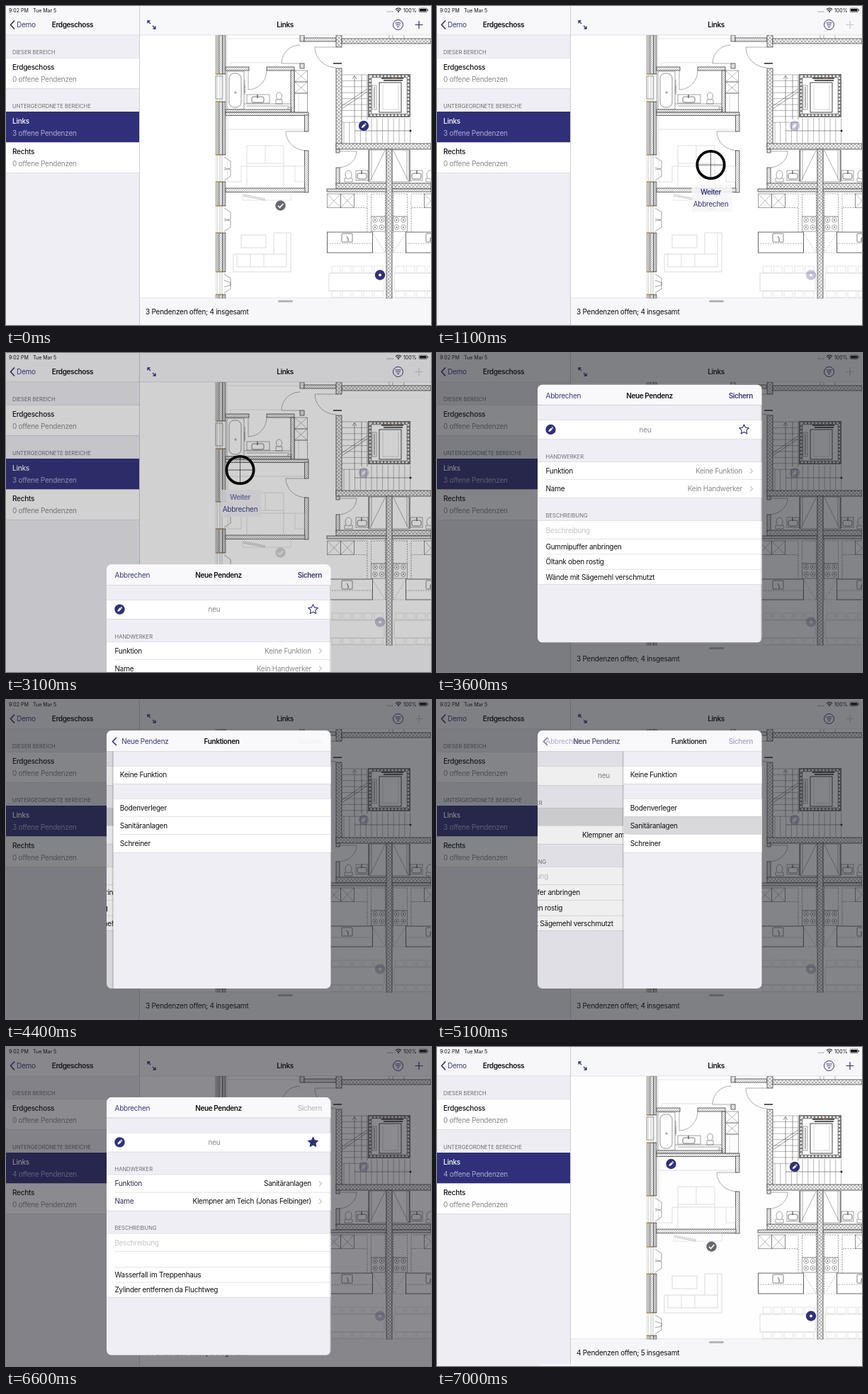
An HTML page for the animation above (7100 ms loop, 600 by 450 pixels).

```html
<!DOCTYPE html>
<html lang="de">
<head>
<meta charset="utf-8">
<title>Neue Pendenz</title>
<style>
html, body { margin: 0; width: 100%; height: 100%; overflow: hidden; background: #fff; }
svg { display: block; width: 600px; height: 450px; }
text { font: 400 10px Inter, "Open Sans", sans-serif; letter-spacing: -.25px; fill: #111; white-space: pre; }
text.b { font-weight: 600; letter-spacing: -.4px; }
text.r { font-weight: 500; }
text.h { font-size: 7.6px; letter-spacing: 0; fill: #6d6d72; }
text.s { font-size: 7px; letter-spacing: 0; }
text.g { fill: #8a8a8f; }
text.p { fill: #c5c5ca; }
text.n { fill: #3a3a80; }
text.w { fill: #fff; }
text.l { fill: #a9a9cf; }
text.m { text-anchor: middle; }
text.e { text-anchor: end; }
</style>
</head>
<body>
<svg id="stage" viewBox="0 0 600 450" xmlns="http://www.w3.org/2000/svg"></svg>
<script>
const NAVY = '#30307a', PALE = '#d2d2d4', LOOP = 7100;
const stage = document.getElementById('stage');

const rect = (x, y, w, h, fill, more = '') =>
  `<rect x="${x}" y="${y}" width="${w}" height="${h}" fill="${fill}" ${more}/>`;
const path = (d, color = '#666', w = .6, more = '') =>
  `<path d="${d}" fill="none" stroke="${color}" stroke-width="${w}" ${more}/>`;
const circle = (x, y, r, fill, more = '') =>
  `<circle cx="${x}" cy="${y}" r="${r}" fill="${fill}" ${more}/>`;
const text = (x, y, str, cls = '', id = '') =>
  `<text x="${x}" y="${y + 3.6}" class="${cls}" ${id && `id="${id}"`}>${str}</text>`;
const group = (id, body, more = '') => `<g id="${id}" ${more}>${body}</g>`;
const box = (x, y, w, h, c = '#666', sw = .6, more = '') =>
  rect(x, y, w, h, 'none', `stroke="${c}" stroke-width="${sw}" ${more}`);
const wall = (x, y, w, h, fill = 'hatch') =>
  rect(x, y, w, h, `url(#${fill})`, 'stroke="#444" stroke-width=".8"');
const crossed = (x, y, w, h) =>
  box(x, y, w, h) + path(`M${x} ${y}l${w} ${h}m0 ${-h}l${-w} ${h}`, '#777', .5);
const bowl = (x, y, rx, ry) =>
  `<ellipse cx="${x}" cy="${y}" rx="${rx}" ry="${ry}" fill="#fff" stroke="#666" stroke-width=".6"/>`;
const repeat = (n, fn) => Array.from({ length: n }, (_, i) => fn(i)).join('');
const line = (x, y, w) => rect(x, y, w, .5, '#c8c7cc');

const defs = `<defs>
  <pattern id="hatch" width="3" height="3" patternUnits="userSpaceOnUse">
    <rect width="3" height="3" fill="#f6f6f6"/><path d="M0 3L3 0" stroke="#888" stroke-width=".6"/></pattern>
  <pattern id="cross" width="5" height="5" patternUnits="userSpaceOnUse">
    <rect width="5" height="5" fill="#f2f2f2"/><path d="M0 0L5 5M5 0L0 5" stroke="#777" stroke-width=".6"/></pattern>
  <clipPath id="planClip"><rect x="188.5" y="41" width="411.5" height="372"/></clipPath>
  <clipPath id="sheetClip"><rect x="142" y="43" width="316.5" height="364" rx="7"/></clipPath>
</defs>`;

function outerWall() {
  const solid = [[41, 55], [135, 75], [248, 34], [320, 55], [407, 6]];
  const windows = [[96, 39], [210, 38], [282, 38], [375, 32]];
  return path('M297.7 41V413', '#c4c2bd', 2.4) + path('M296 41V413M299.500 41V413', '#888', .7) +
    solid.map(([y, h]) => wall(301, y, 4.5, h) + rect(305.5, y, 4.5, h, '#c4c4c4', 'stroke="#444" stroke-width=".6"')).join('') +
    windows.map(([y, h], i) =>
      rect(295.5, y, 14, h, '#fff') + path(`M296 ${y}h14M296 ${y + h}h14`, '#444', .7) +
      path(`M298 ${y}v${h}M302 ${y}v${h}M305 ${y}v${h}`, '#888', .5) +
      path(`M296 ${y}h9M296 ${y + h}h9`, '#c89b4a', 1.2) +
      path(i ? `M308 ${y + 3}l9 6v10l-9 2M308 ${y + h - 2}l9 -6v-9l-9 -3`
             : `M296 ${y + 3}h10v32h-10zM310 ${y}v${h}`)).join('');
}

function bath() {
  return wall(310, 86, 33, 5) + wall(368, 86, 39, 5) + wall(402, 91, 5, 59) +
    box(312, 92, 24, 54) + box(315, 95, 17, 48, '#666', .7, 'rx="7"') + path('M322 122h4m-2-2v4') +
    path('M342 91V118A26 27 0 0 0 368 91', '#777') +
    path('M337 104V123M336 138H402M340 141H400') + path('M337 125V112', '#444', .6, 'stroke-dasharray="2 1"') +
    box(340, 125, 32, 12) + box(347, 128, 17, 8, '#444', .7, 'rx="2"') + path('M355 125v5', '#333', 1) +
    box(381, 132, 9, 6) + bowl(385.5, 127, 4, 5) + box(398, 143, 5, 5) + wall(310, 146, 92, 4);
}

function rooms() {
  return path('M312 46H415M312 41V86M317 86V80H390', PALE) +
    wall(310, 150, 117, 4.5) + wall(421.5, 154, 5.5, 23) + wall(421.5, 204, 5.5, 59) + wall(310, 257, 112, 5.5) +
    path('M424 177H395A29 27 0 0 0 424 204', '#777') +
    path('M313 174H421M313 154V248H332V226H408M340 257V197H392V257M340 222H392M366 197V222', PALE, .7) +
    box(408, 226, 13, 22, PALE) +
    wall(415, 41, 6, 9) + wall(415, 81, 6, 7) + wall(421, 45, 45, 5) +
    path('M415 81H389A26 26 0 0 1 415 55', '#777') +
    repeat(2, i => crossed(407.5, 91 + 16 * i, 18, 16)) + box(407.5, 123, 18, 27) + path('M413 123V150', '#999', .5, 'stroke-dasharray="2 1"') +
    box(334, 263, 68, 11, PALE) + path('M335 266L366 272M335 268L366 274', '#999') +
    box(332, 323, 35, 18, PALE, .8) + path('M321 350H378V320H402V375H321ZM326 350V368H396V320M345 350V368M364 350V368M378 350H396', PALE, .8);
}

function stairwell() {
  return wall(466, 41, 8, 17, 'cross') + wall(474, 46, 126, 7, 'cross') + wall(466, 88, 8, 112, 'cross') +
    path('M541 41V46M546 41V46M562 41V46', '#777') +
    path('M466 58H436A31 29 0 0 0 466 87', '#777') + path('M462 81H474', '#222', 1.6) +
    wall(466, 194, 134, 8, 'cross') +
    repeat(9, i => path(`M474 ${97 + 8.4 * i}H510`, '#888')) + path('M492 164V99M489 103L492 98L495 103M474 141L510 117M474 145L510 121', '#555') +
    repeat(13, i => path(`M${477 + 7.8 * i} ${i < 5 ? 164 : 158}V193`, '#888')) +
    path('M492 176H571M510 97V160M502 97V160', '#555') + circle(571, 176, 1.5, '#222') +
    box(511.5, 96.5, 59, 60, '#333', .7) + box(514, 99, 54, 55, '#777', 4.5) +
    box(514, 99, 54, 55, '#e6e6e6', 2.5, 'stroke-dasharray="3 2"') +
    box(527, 108, 31, 42, '#333', .9) + path('M532 111V146H554V111', '#aaa', .5) +
    path('M530 102H561M533 105H560', '#222', 1.5) + path('M545 102H552', '#b06a3a', 1) +
    box(517, 112, 6, 34) + path('M520 114V144', '#444', .8);
}

function halfFlat() {
  const dash = 'stroke-dasharray="2 1.5"';
  const chairs = repeat(5, i => box(460 + 15 * i, 367, 12, 9, PALE) + box(460 + 15 * i, 402, 12, 9, PALE));
  const burners = repeat(4, i => {
    const x = i % 2 ? 530.5 : 521, y = i < 2 ? 302 : 312;
    return circle(x, y, 3.3, 'none', 'stroke="#666" stroke-width=".6"') + circle(x, y, 1, '#666');
  });
  return box(513, 203, 24, 45) + path('M516 203V245M535 204L514 247', '#777') + path('M512 203V248', '#333', .9) +
    box(478, 243, 11, 5) + bowl(483.5, 238, 4.5, 6) +
    box(494, 232, 17, 14) + box(496, 236, 13, 8, '#444', .7, 'rx="2"') + path('M502 232v5', '#333', 1) +
    repeat(2, i => crossed(453.5 + 19 * i, 265, 19, 19.5)) + box(491.5, 265, 18.5, 19.5, '#666', .6, dash) +
    box(515.5, 265, 20, 32, '#666', .6, dash) + box(515.5, 297, 20, 21) + burners +
    path('M510 285V318M535.500 263V348', '#666', .7, dash) +
    box(453.5, 319, 64, 29, '#444', .8) + path('M453 335H517V348', '#777', .6, dash) +
    box(474, 321, 15, 12, '#555', .7, 'rx="1"') + path('M481 325l2 3v4', '#333', .8) +
    path('M517 319L535 348M517 348H535', '#888', .5, dash) + chairs + box(456, 377, 78, 25, PALE, .8);
}

function plan() {
  return rect(188, 41, 412, 372, '#fff') + outerWall() + bath() + rooms() + stairwell() +
    wall(466, 202, 5, 5) + wall(466, 228, 5, 24) + path('M471 205H495A27 23 0 0 1 471 228', '#777') +
    halfFlat() + `<g transform="translate(1082 0) scale(-1 1)">${halfFlat()}</g>` +
    wall(466, 250, 134, 8, 'cross') + wall(453, 258, 84, 4) + wall(545, 258, 55, 4) + wall(537, 202, 8, 211, 'cross');
}

const pencil = (x, y) => `<g transform="translate(${x} ${y}) rotate(45)"><circle r="7.2" fill="${NAVY}"/>` +
  `<path d="M-1.400 -2.200h2.800v4.400l-1.400 2.200l-1.400 -2.200zM-1.400 -4.200h2.800v1.200h-2.800z" fill="#fff"/></g>`;
const pins = pencil(505, 169) +
  circle(387.5, 281.5, 7.2, '#68686e') + path('M384 281.800l2.600 2.600l4.700 -5.400', '#fff', 1.6) +
  circle(528, 379.5, 7.2, NAVY) + circle(528, 379.5, 2, '#fff');

const reticle = rect(-27, 28, 57, 38, '#f6f6f9', 'opacity=".88"') +
  path('M-19 0H19M0 -19V19', '#222', .7) + circle(0, 0, 19.2, 'none', 'stroke="#000" stroke-width="3.800"') +
  text(0, 38, 'Weiter', 'b n m', 'next') + text(0, 55, 'Abbrechen', 'n m');

const sidebar = rect(0, 41, 188, 409, '#efeef4') +
  text(9, 64.5, 'DIESER BEREICH', 'h') + rect(0, 73, 188, 43, '#fff') +
  text(9, 86.5, 'Erdgeschoss', 'r') + text(9, 103.5, '0 offene Pendenzen', 'g') +
  text(9, 140.5, 'UNTERGEORDNETE BEREICHE', 'h') + rect(0, 149, 188, 43.5, NAVY) +
  text(9, 162, 'Links', 'r w') + text(9, 179, '', 'l', 'open') +
  rect(0, 192.5, 188, 42.5, '#fff') + text(9, 205.5, 'Rechts', 'r') + text(9, 222, '0 offene Pendenzen', 'g') +
  line(0, 73, 188) + line(0, 116, 188) + line(0, 235, 188);

const header = rect(0, 0, 600, 41, '#f8f7fa') + line(0, 40.7, 600) +
  text(4, 5, '9:02 PM', 's') + text(38, 5, 'Tue Mar 5', 's') + text(561, 5, '100%', 's') +
  repeat(4, i => circle(538.5 + 2.4 * i, 8, .6, '#333')) +
  path('M550 4.800q4 -3.500 8 0M551.500 6.500q2.500 -2 5 0', '#111', 1.1) + circle(554, 8, 1, '#111') +
  box(583, 3, 11.5, 5.5, '#333', .6, 'rx="1.300"') + rect(584, 4, 9.5, 3.5, '#111') + rect(595.2, 4.7, .9, 2.2, '#333') +
  path('M12 20.500L6.500 26.500L12 32.500', NAVY, 1.6) + text(15, 26.5, 'Demo', 'n') + text(94, 26.5, 'Erdgeschoss', 'b m') +
  path('M204 25L200 21M200 24.500V21H203.500M207 28L211 32M211 28.500V32H207.500', NAVY, 1.3) + text(394, 26.5, 'Links', 'b m') +
  circle(553.5, 26.5, 7, 'none', `stroke="${NAVY}"`) + path('M549.500 24H557.500M550.500 26.700H556.500M552 29.400H555', NAVY, 1) +
  path('M577.500 26.500H588.500M583 21V32', NAVY, 1.2, 'id="plus"');

const footer = rect(188, 411, 412, 2, '#000', 'opacity=".07"') + rect(188, 412.5, 412, 37.5, '#f7f6f8') +
  rect(384, 415, 21, 3, '#b5b5b9', 'rx="1.500"') + text(197, 431.5, '', '', 'total');

const more = y => path(`M442 ${y - 3.5}l3.500 3.500l-3.500 3.500`, '#c0c0c5', 1.1);
const starPath = 'M433.500 99.500l2.050 4.300 4.750 .6 -3.480 3.280 .9 4.700 -4.220 -2.300 -4.220 2.300 .9 -4.700 -3.480 -3.280 4.750 -.6z';
const form = rect(142, 72, 317, 335, '#efeef4') +
  rect(142, 93, 317, 27, '#fff') + line(142, 93, 317) + line(142, 120, 317) + pencil(160.5, 106.5) + text(294, 106.5, 'neu', 'm g') +
  `<path id="star" d="${starPath}" stroke="${NAVY}" stroke-width="1.100" stroke-linejoin="round"/>` +
  text(153.5, 144, 'HANDWERKER', 'h') + rect(142, 152, 317, 51, '#fff') + rect(142, 152, 317, 25, '#d2d1d6', 'id="pressed"') +
  text(153.5, 165, 'Funktion', '', 'jobLabel') + text(153.5, 190, 'Name', '', 'nameLabel') +
  text(431, 165, '', 'e', 'job') + text(431, 190, '', 'e', 'worker') + more(165) + more(190) +
  line(142, 152, 317) + line(153.5, 177, 305) + line(142, 203, 317) +
  text(153.5, 227, 'BESCHREIBUNG', 'h') + rect(142, 235, 317, 90, '#fff') + text(153.5, 248.5, 'Beschreibung', 'p') +
  repeat(3, i => text(153.5, 271.5 + 21.7 * i, '', '', 'hint' + i) + line(153.5, 260.5 + 21.7 * i, 305)) +
  line(142, 235, 317) + line(142, 325, 317);

const list = rect(140, 72, 2, 335, '#000', 'opacity=".14"') + rect(142, 72, 317, 335, '#efeef4') +
  rect(142, 93, 317, 25, '#fff') + text(151, 105.5, 'Keine Funktion') +
  rect(142, 139, 317, 76, '#fff') + rect(142, 164, 317, 25.5, '#d9d8db', 'id="chosen"') +
  ['Bodenverleger', 'Sanitäranlagen', 'Schreiner'].map((s, i) => text(151, 152 + 25.2 * i, s) + line(i ? 151 : 142, 139 + 25.2 * i, 317)).join('') +
  line(142, 93, 317) + line(142, 118, 317) + line(142, 215, 317);

const sheetBar = rect(142, 43, 317, 29, '#f9f8fb') + line(142, 72, 317) +
  text(153.5, 58.5, 'Abbrechen', 'n', 'cancel') + path('M156 53L150.500 58.500L156 64', NAVY, 1.6, 'id="back"') +
  group('title', text(0, 58.5, 'Neue Pendenz', 'b m', 'titleDark') + text(0, 58.5, 'Neue Pendenz', 'n m', 'titleBack')) +
  text(0, 58.5, 'Funktionen', 'b m', 'listTitle') + text(446, 58.5, 'Sichern', 'b n e', 'save');

stage.innerHTML = defs +
  group('view', plan() + group('pins', pins) + group('newPin', pencil(330.5, 165)) + group('reticle', reticle), 'clip-path="url(#planClip)"') +
  footer + sidebar + header + rect(188, 0, .7, 450, '#b9b8bd') +
  rect(0, 0, 600, 450, '#1e1f26', 'id="dim"') +
  group('sheet', `<g clip-path="url(#sheetClip)">${group('form', form)}${rect(142, 72, 317, 335, '#000', 'id="shade"')}${group('list', list)}${sheetBar}</g>`);

const el = {};
stage.querySelectorAll('[id]').forEach(n => el[n.id] = n);
const fade = (id, v) => el[id].setAttribute('opacity', v);
const move = (id, x, y = 0) => el[id].setAttribute('transform', `translate(${x} ${y})`);
const write = (id, s) => { if (el[id].textContent !== s) el[id].textContent = s; };
const ramp = (t, a, b) => Math.min(1, Math.max(0, (t - a) / (b - a)));
const smooth = x => x * x * (3 - 2 * x);
// Critically damped spring from 0 to 1
const spring = (t, start, w) => {
  const x = Math.max(0, t - start) / 1000 * w;
  return 1 - (1 + x) * Math.exp(-x);
};

const hintsBefore = ['Gummipuffer anbringen', 'Öltank oben rostig', 'Wände mit Sägemehl verschmutzt'];
const hintsAfter = ['', 'Wasserfall im Treppenhaus', 'Zylinder entfernen da Fluchtweg'];

function render(t) {
  const saved = t >= 6500, picked = t >= 5000;
  const up = spring(t, 3000, 13) - spring(t, 6575, 17);
  const push = Math.max(0, spring(t, 4000, 13.3) - spring(t, 5000, 13.3));

  const placing = ramp(t, 200, 600) * (1 - ramp(t, 6600, 7000));
  fade('pins', 1 - .72 * placing);
  fade('newPin', saved ? 1 : 0);
  el.plus.setAttribute('stroke', t >= 200 && !saved ? '#c9c9ce' : NAVY);
  const drag = smooth(ramp(t, 800, 2200));
  move('reticle', 394 - 63.5 * drag, 232 - 67 * drag);
  fade('reticle', saved ? 0 : ramp(t, 200, 500));
  fade('next', t >= 2800 ? .65 : 1);
  write('open', `${saved ? 4 : 3} offene Pendenzen`);
  write('total', saved ? '4 Pendenzen offen; 5 insgesamt' : '3 Pendenzen offen; 4 insgesamt');

  fade('dim', .55 * up);
  move('sheet', 0, 407 * (1 - up));
  move('form', -95 * push);
  fade('shade', .1 * push);
  move('list', 317 * (1 - push));
  fade('chosen', picked ? 1 : 0);
  fade('pressed', t < 4000 ? 0 : picked ? push ** .3 : 1);

  fade('cancel', 1 - push);
  fade('back', push);
  move('title', 300 - 106 * push ** .72);
  fade('titleDark', 1 - push);
  fade('titleBack', push);
  move('listTitle', 300 + 145 * (1 - push));
  fade('listTitle', Math.min(1, push * 1.4));
  fade('save', 1 - push);
  el.save.style.fill = saved ? '#c3c3c9' : '';

  write('job', picked ? 'Sanitäranlagen' : 'Keine Funktion');
  write('worker', picked ? 'Klempner am Teich (Jonas Felbinger)' : 'Kein Handwerker');
  el.job.style.fill = el.worker.style.fill = picked ? '#111' : '#8a8a8f';
  el.jobLabel.style.fill = el.nameLabel.style.fill = picked ? '#2b2b58' : '#111';
  (t >= 5600 ? hintsAfter : hintsBefore).forEach((s, i) => write('hint' + i, s));
  el.star.setAttribute('fill', t >= 5900 ? NAVY : 'none');
}

const begin = performance.now();
function tick() {
  const t = (performance.now() - begin) % LOOP;
  render(Math.floor(t / 100) * 100);
  requestAnimationFrame(tick);
}
tick();
</script>
</body>
</html>
```
